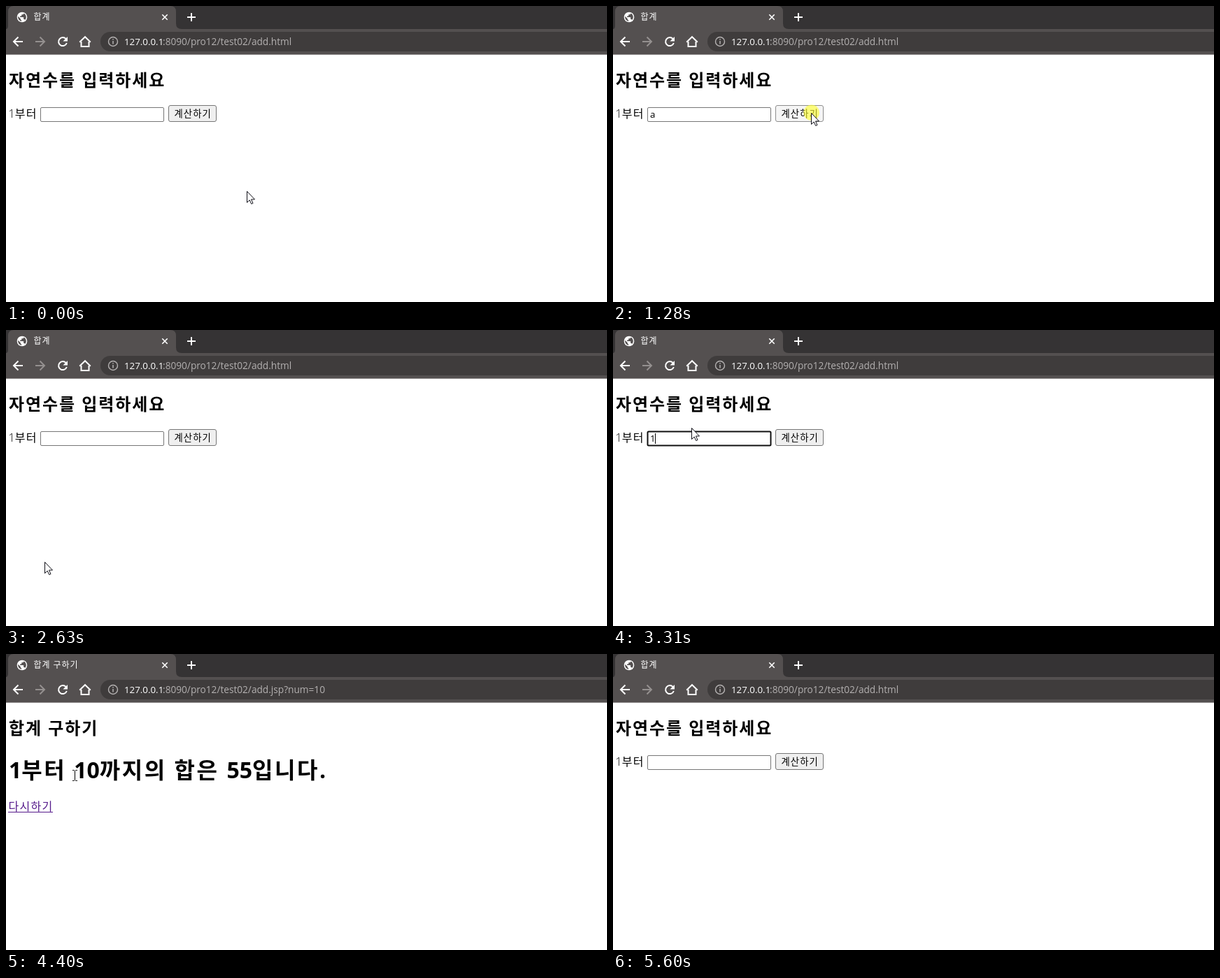
An HTML page that plays this animation: 859 px wide and 424 px high, repeating every 5.73 s.

```html
<!DOCTYPE html>
<html lang="ko">
<head>
<meta charset="utf-8">
<title>합계</title>
<style>
  html, body { margin: 0; width: 100%; height: 100%; overflow: hidden; background: #fff; }
  svg { display: block; width: 100%; height: 100%; }
  text { font-family: "Open Sans", "Noto Sans CJK KR", "Noto Sans CJK", sans-serif; white-space: pre; word-spacing: .08em; }
  .ko { font-family: "Noto Sans CJK KR", "Noto Sans CJK", sans-serif; letter-spacing: .08em; }
  .eq { letter-spacing: 1.8px; }
</style>
</head>
<body>
<svg id="stage" viewBox="0 0 859 424">
  <rect width="859" height="424" fill="#fff"/>
  <g id="chrome">
    <rect width="859" height="34" fill="#353334"/>
    <rect y="33" width="859" height="36" fill="#545050"/>
    <path d="M0 33Q3 33 3 28V8Q3 0 11 0H235Q243 0 243 8V25Q243 33 251 33Z" fill="#545050"/>
    <path d="M0 69.5H859" stroke="#8f8c8c"/>
    <rect x="135" y="37" width="760" height="28" rx="14" fill="#3f3c3c"/>
    <circle cx="23" cy="16" r="7.3" fill="#fff"/>
    <path transform="translate(14.24 7.24) scale(.73)" fill="#545050" d="M11 19.93C7 19.4 4 16 4 12L4.2 10.2 9 15V16Q9 18 11 18ZM17.9 17.4Q17.4 16 16 16H15V13Q15 12 14 12H8V10H10Q11 10 11 9V7H13Q15 7 15 5V4.6C18 5.8 20 8.6 20 12Q20 15 17.9 17.4Z"/>
    <path d="M223.3 12.3L230.7 19.7M230.7 12.3L223.3 19.7" stroke="#fff" stroke-width="1.6"/>
    <path d="M265 10V22M259 16H271" stroke="#fff" stroke-width="1.9"/>
    <g fill="none" stroke="#fff" stroke-width="2">
      <path d="M24 51H11.5M17.5 44.5L11 51 17.5 57.5"/>
      <path d="M42 51H54.5M48.5 44.5L55 51 48.5 57.5" stroke="#94908f"/>
      <path d="M85.7 47.2A6 6 0 1 0 86.8 53"/>
      <path d="M107.5 51V58H118.5V51M105.2 51.7L113 44.2 120.8 51.7"/>
    </g>
    <path d="M88 44V50.5H81.5Z" fill="#fff"/>
    <circle cx="153" cy="51" r="6.5" fill="none" stroke="#b5b2b2" stroke-width="1.4"/>
    <path d="M153 50V54.5M153 47V48.6" stroke="#b5b2b2" stroke-width="1.5"/>
  </g>
  <g id="form">
    <rect id="box" x="49.5" y="145.5" width="176" height="20" rx="1.5" fill="#fff"/>
    <rect id="button" x="232.5" y="142.5" width="68" height="23" rx="2.5"/>
    <path id="caret" stroke="#000"/>
  </g>
  <g id="error"></g>
  <g id="result"></g>
  <circle id="glow" r="11.3" fill="#ffff30" opacity=".62"/>
  <g id="cursor">
    <path id="arrow" d="M.5 .5V16.5L4.2 13 6.7 18.5 9 17.5 6.5 12H11.5Z" fill="#fff" stroke="#101018"/>
    <path id="beam" d="M-3 -7.5H-.5L.5 -6.5 1.5 -7.5H4M.5 -6.5V6.5M-3 7.5H-.5L.5 6.5 1.5 7.5H4" fill="none" stroke="#000"/>
    <path id="hand" d="M-1.5 1.5Q0 -.5 1.5 1.5V8Q3.5 6.5 4.5 8.5 6.5 7.5 7.5 9.5 9.5 8.5 9.5 11.5V16L7.5 19V22H-1V19.5L-6.5 13Q-6.5 10.5 -4 11.5L-1.5 14Z" fill="#fff" stroke="#000"/>
  </g>
</svg>
<script>
const LOOP = 5730;
const $ = id => document.getElementById(id);
const make = (tag, parent, attrs = {}) => {
  const el = document.createElementNS('http://www.w3.org/2000/svg', tag);
  for (const key in attrs) el.setAttribute(key, attrs[key]);
  parent.appendChild(el);
  return el;
};
const show = (el, on) => el.setAttribute('visibility', on ? 'visible' : 'hidden');

// Hangul runs sit on a full-em pitch, everything else keeps its own.
function fill(el, str) {
  if (el.dataset.str === str) return;
  el.dataset.str = str;
  el.textContent = '';
  for (const run of str.match(/[가-힣]+|[^가-힣]+/g) || []) {
    const cls = /[가-힣]/.test(run) ? 'ko' : /^=+$/.test(run) ? 'eq' : '';
    make('tspan', el, { class: cls }).textContent = run;
  }
}
function text(parent, x, y, size, str, attrs = {}) {
  const el = make('text', parent, { x, y, 'font-size': size, ...attrs });
  fill(el, str);
  return el;
}
const bold = { 'font-weight': 700 };
const light = { 'font-weight': 350 };
const PURPLE = '#551a8b';

const title = text($('chrome'), 39.5, 20, 12, '', { fill: '#fff' });
text($('chrome'), 169, 56, 13.3, '127.0.0.1', { fill: '#fff' });
const path = text($('chrome'), 224, 56, 13.67, '', { fill: '#b3b0b0' });

const form = $('form');
text(form, 4, 115, 24, '자연수를 입력하세요', bold);
text(form, 3.5, 160, 16, '1부터', light);
text(form, 240.5, 159, 13.33, '계산하기', light);
const value = text(form, 53, 160, 13.33, '');

const error = $('error');
for (const [y, name, x] of [[95, 'toString()', 150.5], [223, 'getMessage()', 180.5], [330, 'printStackTrace()', 202]]) {
  text(error, 4, y, 16, '======');
  text(error, 76, y, 15.4, name);
  text(error, x, y, 16, '내용', light);
  text(error, x + 37.5, y, 16, '=======');
}
const words = [[4, 'java.lang.NumberFormatException:'], [547, 'For'], [607, 'input'], [696, 'string:'], [807, '"a"']];
words.forEach(([x, word], i) => {
  text(error, x, 155, 30, word, bold);
  if (i) text(error, x - 543, 283, 30, word, bold);
});
text(error, 3.5, 373, 18.72, '숫자만 입력 가능합니다. 다시 시도하세요.', bold);
text(error, 3.5, 398, 18.72, '다시하기', { ...bold, fill: PURPLE });
make('rect', error, { x: 3, y: 401, width: 75, height: 1.6, fill: PURPLE });

const result = $('result');
text(result, 4, 115, 24, '합계 구하기', bold);
text(result, 4, 177.5, 32, '1부터 10까지의 합은 55입니다.', bold);
text(result, 3.5, 224, 16, '다시하기', { ...light, fill: PURPLE });
make('rect', result, { x: 3, y: 226, width: 64, height: 1, fill: PURPLE });

// Each track holds its last entry until the next time.
const pages = [[0, 'form'], [1480, 'error'], [2490, 'form'], [3580, 'result'], [5340, 'form']];
const typed = [[0, ''], [620, 'a'], [2490, ''], [3310, '1'], [3510, '10'], [5340, '']];
const moves = [
  [0, 344, 265, 'arrow'], [70, 318, 243, 'arrow'], [140, 240, 197, 'arrow'], [200, 165, 166, 'arrow'], [270, 126, 155, 'beam'],
  [680, 140, 156, 'beam'], [750, 175, 157, 'beam'], [810, 210, 157, 'beam'], [880, 238, 156, 'arrow'], [950, 258, 154, 'arrow'],
  [1010, 272, 153, 'arrow'], [1080, 283, 153, 'arrow'],
  [2150, 242, 195, 'arrow'], [2220, 160, 290, 'arrow'], [2290, 75, 365, 'arrow'], [2350, 34, 388, 'hand'], [2490, 34, 388, 'arrow'],
  [2560, 40, 372, 'arrow'], [2630, 55, 332, 'arrow'], [2700, 85, 183, 'arrow'], [2780, 108, 160, 'beam'], [2840, 122, 150, 'beam'],
  [3110, 118, 147, 'beam'], [3310, 112, 140, 'arrow'],
  [4400, 98, 174, 'beam'], [4470, 90, 184, 'arrow'], [4540, 79, 196, 'arrow'], [4600, 66, 209, 'arrow'], [4670, 56, 222, 'hand'],
  [4740, 51, 229, 'hand'], [4810, 49, 222, 'hand'],
  [5340, 49, 222, 'arrow'], [5410, 44, 260, 'arrow'], [5470, 30, 315, 'arrow'], [5540, 14, 352, 'arrow'], [5600, 0, 0, '']
];
const clicks = [[340, 480], [1280, 1480], [2350, 2490], [2910, 3050], [4950, 5010]];
const focus = [[340, 1280], [2910, 3580]];
const titles = { form: '합계', error: '에러 페이지', result: '합계 구하기' };
const files = { form: 'add.html', error: 'add.jsp?num=a', result: 'add.jsp?num=10' };

const at = (track, t) => track.filter(k => k[0] <= t).pop();
const within = (spans, t) => spans.some(([a, b]) => t >= a && t < b);
const set = (id, attrs) => { for (const key in attrs) $(id).setAttribute(key, attrs[key]); };

function render(t) {
  const page = at(pages, t)[1];
  const [, x, y, shape] = at(moves, t);
  const pressed = within(clicks, t);
  const focused = within(focus, t);
  const str = at(typed, t)[1];

  for (const id in titles) $(id).style.display = id === page ? '' : 'none';
  fill(title, titles[page]);
  fill(path, ':8090/pro12/test02/' + files[page]);
  fill(value, str);

  set('box', { stroke: focused ? '#101010' : '#767676', 'stroke-width': focused ? 2 : 1 });
  const caretX = 53.5 + Math.round(str.length * 7.3);
  set('caret', { d: `M${caretX} 148V163` });
  show($('caret'), focused);

  const hover = page === 'form' && x >= 232 && x < 301 && y >= 142 && y < 166;
  set('button', {
    fill: !hover ? '#efefef' : pressed ? '#f5f5f5' : '#e5e5e5',
    stroke: !hover ? '#767676' : pressed ? '#8d8d8d' : '#4f4f4f'
  });

  set('glow', { cx: x + .7, cy: y - .3 });
  show($('glow'), pressed);
  set('cursor', { transform: `translate(${x} ${y})` });
  for (const id of ['arrow', 'beam', 'hand']) show($(id), id === shape);
}

const start = performance.now();
function tick() {
  render((performance.now() - start) % LOOP);
  requestAnimationFrame(tick);
}
tick();
</script>
</body>
</html>
```
